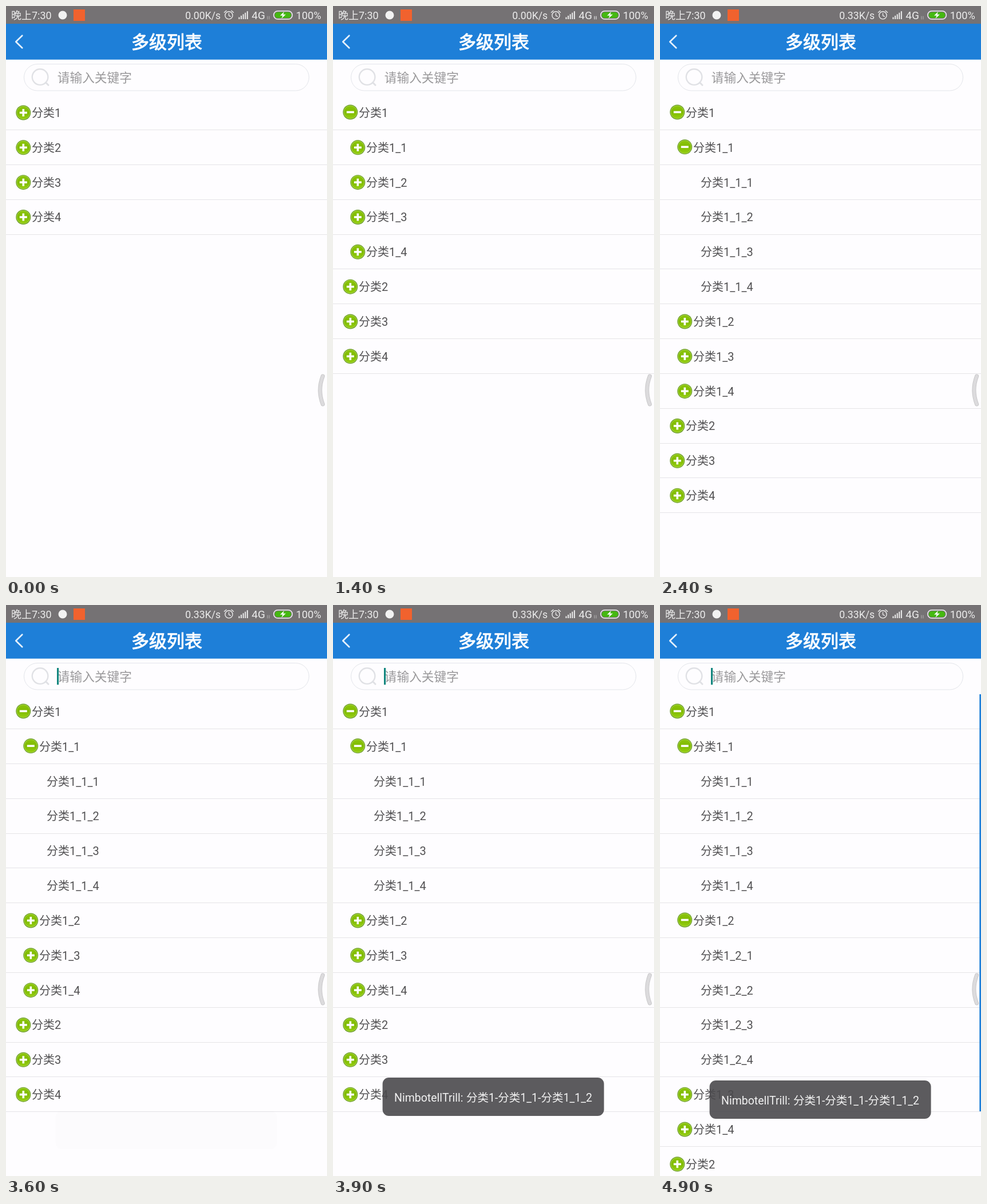
Write an HTML page with a canvas that moves like this. It is 561 by 998 pixels and loops after 5 s.

```html
<!DOCTYPE html>
<html lang="zh">
<head>
<meta charset="utf-8">
<style>
  html, body { margin: 0; width: 100%; height: 100%; overflow: hidden; background: #fefdff; }
  canvas { display: block; width: 561px; height: 998px; }
</style>
</head>
<body>
<canvas id="stage"></canvas>
<script>
const W = 561, H = 998, LOOP = 5000, STEP = 100;
const FONT = 'Roboto, "Noto Sans CJK SC", "Noto Sans CJK", sans-serif';
const BLUE = '#1e7fd8', PAPER = '#fefdff', PALE = '#ececec';
const ROW_TOP = 155.3, ROW_H = 60.83;

// Moments at which each branch unfolds
const OPEN_AT = { '1': 1200, '1_1': 1900, '1_2': 4700 };
const SPEED_AT = 1500;

// Toast path: time, top, opacity
const TOAST = [
  [3500, 892, 0], [3600, 884, 0.015], [3700, 852, 0.36], [3800, 830, 0.8],
  [3900, 826, 1], [4000, 828, 1], [4100, 831, 1]
];

const canvas = document.getElementById('stage');
const ctx = canvas.getContext('2d');
const ratio = window.devicePixelRatio || 1;
canvas.width = W * ratio;
canvas.height = H * ratio;

function text(str, x, y, size, color) {
  ctx.font = `${size}px ${FONT}`;
  ctx.fillStyle = color;
  ctx.fillText(str, x, y);
}

function rect(x, y, w, h, color) {
  ctx.fillStyle = color;
  ctx.fillRect(x, y, w, h);
}

function pill(x, y, w, h, r) {
  ctx.beginPath();
  ctx.roundRect(x, y, w, h, r);
}

function disc(x, y, r, fill) {
  ctx.beginPath();
  ctx.arc(x, y, r, 0, Math.PI * 2);
  ctx.fillStyle = fill;
  ctx.fill();
}

function ring(x, y, r, color, width) {
  ctx.beginPath();
  ctx.arc(x, y, r, 0, Math.PI * 2);
  ctx.strokeStyle = color;
  ctx.lineWidth = width;
  ctx.stroke();
}

function line(points, color, width) {
  ctx.beginPath();
  points.forEach(([x, y]) => ctx.lineTo(x, y));
  ctx.strokeStyle = color;
  ctx.lineWidth = width;
  ctx.stroke();
}

function drawAlarm(x, y) {
  ring(x, y + 0.5, 6.6, PALE, 1.4);
  line([[x, y - 3], [x, y + 1], [x + 3, y + 2.5]], PALE, 1.3);
  line([[x - 8, y - 4.5], [x - 4.5, y - 7.5]], PALE, 1.5);
  line([[x + 8, y - 4.5], [x + 4.5, y - 7.5]], PALE, 1.5);
}

function drawBattery() {
  pill(467.8, 8.7, 32.6, 14.4, 7.2);
  ctx.strokeStyle = '#f4f4f4';
  ctx.lineWidth = 1.5;
  ctx.stroke();
  pill(469.8, 10.7, 28.6, 10.4, 5.2);
  ctx.fillStyle = '#45b811';
  ctx.fill();
  ctx.beginPath();
  [[486, 10], [479, 16.8], [483.5, 16.8], [481.5, 22], [489, 14.8], [484.5, 14.8]]
    .forEach(([x, y]) => ctx.lineTo(x, y));
  ctx.fillStyle = '#fff';
  ctx.fill();
}

function drawStatus(t) {
  rect(0, 0, W, 31, '#757274');
  text('晚上7:30', 9, 22.7, 18, PALE);
  disc(99, 16, 7.5, '#f2f2f2');
  rect(118, 6, 20, 20, '#f1622e');
  text(t < SPEED_AT ? '0.00K/s' : '0.33K/s', 313.2, 22.5, 17.7, PALE);
  drawAlarm(389.5, 15.8);
  for (let i = 0; i < 5; i++) {
    const h = 3.5 + i * 2.6;
    rect(406.5 + i * 3.6, 23 - h, 2, h, PALE);
  }
  text('4G', 429.3, 22.7, 19, PALE);
  const busy = t >= 1400 && t < 2200;
  const tone = busy ? '#e2e2e2' : '#aaa8a9';
  line([[457, 18], [457, 23]], tone, 1.2);
  line([[460, 18], [460, 23]], tone, 1.2);
  drawBattery();
  text('100%', 506.7, 22.5, 18.3, PALE);
}

function drawHeader() {
  rect(0, 31, W, 62.7, BLUE);
  line([[28.3, 51.8], [17.3, 62.5], [28.3, 73.3]], '#e4f0fc', 2.7);
  text('多级列表', 219, 74, 31, '#fff');
  ctx.strokeStyle = '#fff';
  ctx.lineWidth = 1;
  ctx.strokeText('多级列表', 219, 74);
}

function drawSearch(t) {
  pill(31.5, 101.5, 498, 46.5, 23.2);
  ctx.strokeStyle = '#e3e5ea';
  ctx.lineWidth = 1;
  ctx.stroke();
  ring(59.6, 124.1, 13.8, '#e0e1e5', 2.4);
  line([[69.5, 133.8], [74, 138.3]], '#e0e1e5', 3);
  text('请输入关键字', 89.8, 133.2, 21.7, '#9a999b');
  if (t % 1000 >= 500) rect(89, 110, 3.2, 29.3, '#13877f');
}

function drawToggle(x, y, open) {
  const glow = ctx.createLinearGradient(0, y - 12, 0, y + 12);
  glow.addColorStop(0, '#8cc60c');
  glow.addColorStop(0.5, '#7fba00');
  glow.addColorStop(1, '#96d012');
  disc(x, y, 13, '#6a9a28');
  disc(x, y, 11.8, '#aad648');
  disc(x, y, 10.8, glow);
  rect(x - 6.5, y - 1.8, 13, 3.6, '#fff');
  if (!open) rect(x - 1.8, y - 6.5, 3.6, 13, '#fff');
}

function listRows(t) {
  const rows = [];
  const add = (id, depth) => {
    const open = t >= OPEN_AT[id];
    rows.push({ id, depth, open });
    if (open) for (let i = 1; i <= 4; i++) add(`${id}_${i}`, depth + 1);
  };
  for (let i = 1; i <= 4; i++) add(String(i), 0);
  return rows;
}

function drawList(t) {
  listRows(t).forEach(({ id, depth, open }, i) => {
    const top = ROW_TOP + i * ROW_H;
    if (top > H) return;
    const mid = top + 31.2, indent = depth * 13;
    if (depth < 2) drawToggle(30.3 + indent, mid - (open ? 1 : 0), open);
    text('分类' + id, 45 + indent, mid + 7.5, 20, '#515052');
    rect(0, Math.round(top + ROW_H), W, 1, '#e5e4e7');
  });
  if (t >= OPEN_AT['1_2']) rect(558.3, 156, 2.7, 729, BLUE);
}

function drawHandle() {
  const stroke = (color, width) => {
    ctx.beginPath();
    ctx.moveTo(553.6, 647);
    ctx.quadraticCurveTo(544.2, 671.5, 553.6, 696);
    ctx.strokeStyle = color;
    ctx.lineWidth = width;
    ctx.stroke();
  };
  stroke('#c3c2c4', 7);
  stroke('#dcdbdd', 5.4);
}

function toastPose(t) {
  const next = TOAST.findIndex(k => k[0] > t);
  if (next < 0) return TOAST[TOAST.length - 1].slice(1);
  const a = TOAST[next - 1], b = TOAST[next];
  const p = (t - a[0]) / (b[0] - a[0]);
  return [1, 2].map(i => a[i] + (b[i] - a[i]) * p);
}

function drawToast(t) {
  if (t < TOAST[0][0]) return;
  const [y, alpha] = toastPose(t);
  ctx.globalAlpha = alpha;
  pill(86.6, y, 387, 67, 11);
  ctx.fillStyle = 'rgba(75, 74, 77, 0.9)';
  ctx.fill();
  text('NimbotellTrill:', 107, y + 41.6, 19.5, '#f2f2f2');
  text('分类1-分类1_1-分类1_1_2', 233, y + 41.6, 19.5, '#f2f2f2');
  ctx.globalAlpha = 1;
}

function draw(now) {
  const t = Math.floor((now % LOOP) / STEP) * STEP;
  ctx.setTransform(ratio, 0, 0, ratio, 0, 0);
  ctx.lineCap = 'round';
  ctx.lineJoin = 'round';
  rect(0, 0, W, H, PAPER);
  drawList(t);
  drawStatus(t);
  drawHeader();
  drawSearch(t);
  drawHandle();
  drawToast(t);
}

const start = performance.now();
function tick() {
  draw(performance.now() - start);
  requestAnimationFrame(tick);
}
tick();
</script>
</body>
</html>
```
